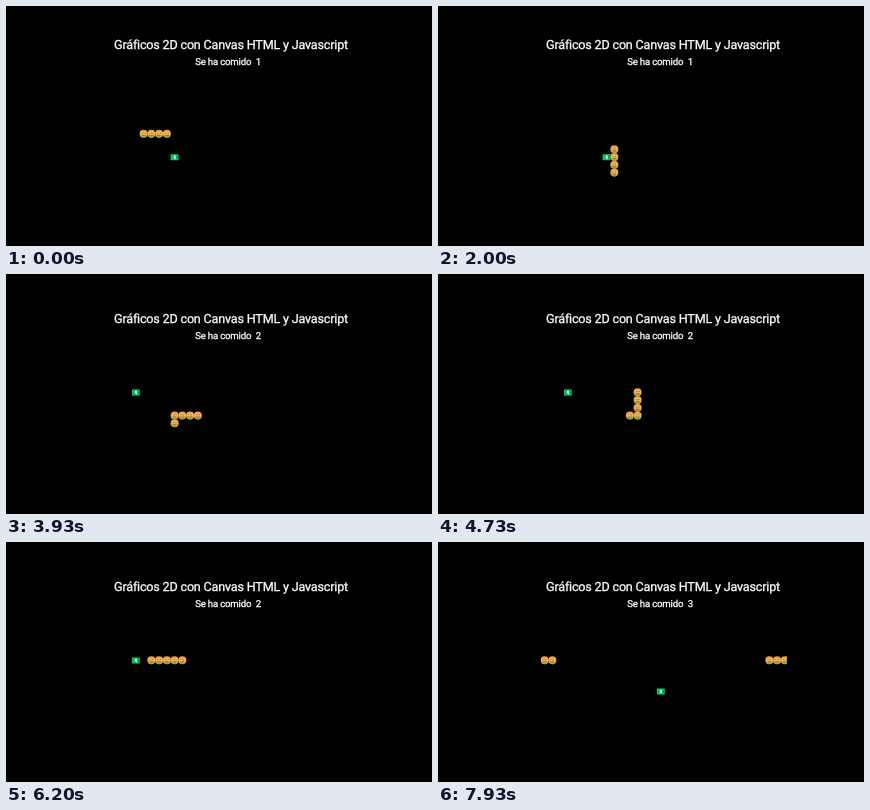
An HTML page that plays this animation: 426x240 px, repeating every 8000 ms.

```html
<!DOCTYPE html>
<html lang="es">
<head>
<meta charset="utf-8">
<title>Gráficos 2D</title>
<style>
  html, body { margin: 0; width: 100%; height: 100%; overflow: hidden; background: #000; }
  svg { display: block; width: 100vw; height: 100vh; }
  text {
    font-family: Roboto, Arial, sans-serif; fill: #fff; stroke: #fff; stroke-width: .3;
    white-space: pre; letter-spacing: -.19px; text-rendering: geometricPrecision;
  }
</style>
</head>
<body>
<svg viewBox="0 0 426 240">
  <defs>
    <clipPath id="board"><rect x="102.5" y="60" width="246.5" height="180"/></clipPath>
    <g id="face">
      <circle r="4" fill="#f4a238"/>
      <ellipse cx="-1.7" cy="-.6" rx="1.2" ry="1.4" fill="#f3d48c"/>
      <ellipse cx="1.7" cy="-.6" rx="1.2" ry="1.4" fill="#f3d48c"/>
      <circle cx="-1.5" cy="-.6" r=".7" fill="#7d5a2c"/>
      <circle cx="1.5" cy="-.6" r=".7" fill="#7d5a2c"/>
      <path d="M-2.2 1.2H2.2L1.6 2.4H-1.6Z" fill="#a2502c"/>
      <ellipse cy="2.9" rx="2" ry="1.1" fill="#58bd72"/>
    </g>
    <g id="bill" transform="translate(0 .3)">
      <rect x="-3.9" y="-3" width="7.8" height="6" fill="#14cc6c"/>
      <rect x="-3" y="-2" width="1.2" height="4" fill="#0da45c"/>
      <path d="M-.9 -1.4H1.1V1.8H-.1V.4H-.9Z" fill="#d4f8e2"/>
      <rect x="1.7" y="-2" width="1.3" height="4" fill="#0a8f50"/>
    </g>
  </defs>
  <g id="page">
    <text x="225" y="42.9" font-size="12.6" text-anchor="middle">Gráficos 2D con Canvas HTML y Javascript</text>
    <text id="score" x="189.2" y="58.6" font-size="9.65"></text>
    <g id="game" clip-path="url(#board)"><use id="food" href="#bill"/></g>
  </g>
</svg>
<script>
const LOOP = 8000, STEP = 200, FIRST_STEP = 125;
const CELL = 7.75, LEFT = 106.6, TOP = 127.7;
const COLUMNS = 33; // the last column lies outside the board
const START_LENGTH = 4, GROW_DELAY = 2;
const SCROLL = { start: 2390, duration: 110, distance: 6 };

const moves = [['L', 3], ['D', 2], ['R', 5], ['D', 4], ['L', 1], ['U', 5], ['R', 4], ['U', 3], ['L', 16]];
const directions = { L: [-1, 0], R: [1, 0], U: [0, -1], D: [0, 1] };
const meals = [15, 33];
const foods = [[8, 3], [3, -2], [15, 2]];

const trail = [[7, 0]];
for (const [key, count] of moves) {
  const [dx, dy] = directions[key];
  for (let n = 0; n < count; n++) {
    const [x, y] = trail[trail.length - 1];
    trail.push([(x + dx + COLUMNS) % COLUMNS, y + dy]);
  }
}

const get = id => document.getElementById(id);
const page = get('page'), game = get('game'), food = get('food'), score = get('score');

const segments = Array.from({ length: START_LENGTH + meals.length }, () => {
  const segment = document.createElementNS('http://www.w3.org/2000/svg', 'use');
  segment.setAttribute('href', '#face');
  return game.appendChild(segment);
});

function place(node, [column, row]) {
  node.setAttribute('transform', `translate(${LEFT + column * CELL} ${TOP + row * CELL})`);
}

function draw(time) {
  const step = Math.floor((time - FIRST_STEP) / STEP) + 1;
  const eaten = meals.filter(meal => step >= meal).length;
  const length = START_LENGTH + meals.filter(meal => step >= meal + GROW_DELAY).length;
  const head = step + START_LENGTH - 1;

  segments.forEach((segment, i) => {
    const visible = i < length;
    segment.style.display = visible ? '' : 'none';
    if (visible) place(segment, trail[head - i]);
  });
  place(food, foods[eaten]);

  const label = `Se ha comido \u00a0${eaten + 1}`;
  if (score.textContent !== label) score.textContent = label;

  const p = Math.min(1, Math.max(0, (time - SCROLL.start) / SCROLL.duration));
  page.setAttribute('transform', `translate(0 ${SCROLL.distance * p * p * (3 - 2 * p)})`);
}

const begin = performance.now();
function tick() {
  draw((performance.now() - begin) % LOOP);
  requestAnimationFrame(tick);
}
tick();
</script>
</body>
</html>
```
